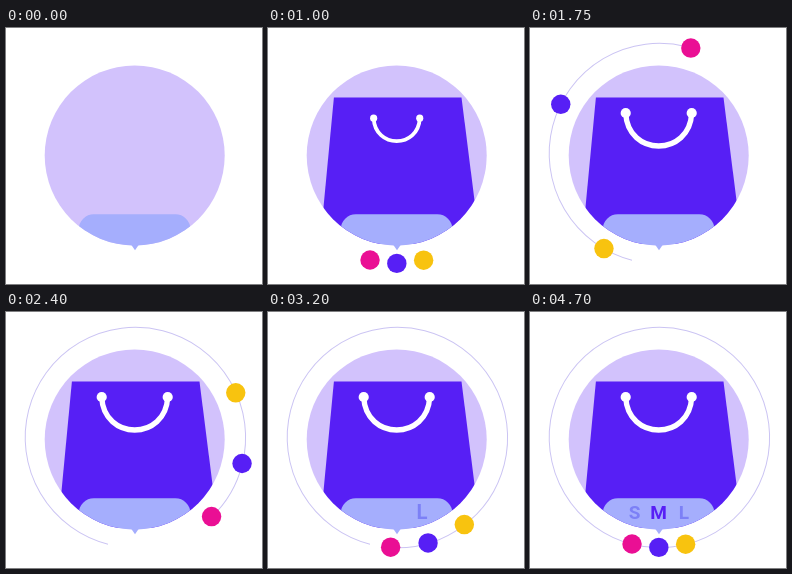
An HTML page that plays this animation: 256 px wide and 256 px high, repeating every 4.75 s.

```html
<!DOCTYPE html>
<html lang="en">
<head>
<meta charset="utf-8">
<title>Shopping bag</title>
<style>
  html, body { margin: 0; height: 100%; overflow: hidden; background: #fff; }
  svg { display: block; width: 100vw; height: 100vh; }
  text { font: 700 19px Roboto, sans-serif; text-anchor: middle; fill: #7c80f6; }
</style>
</head>
<body>
<svg viewBox="0 0 256 256">
  <clipPath id="disc"><circle cx="128.7" cy="127.5" r="90"/></clipPath>
  <circle cx="128.7" cy="127.5" r="90" fill="#d2c2fc"/>
  <g clip-path="url(#disc)">
    <path id="bag" d="M65.9 69.5H193.5L212 216H52Z" fill="#571ff5"/>
    <g id="handle" fill="#fff">
      <path d="M95.7 85C97.7 129 159.7 129 161.7 85" fill="none" stroke="#fff" stroke-width="5.4"/>
      <circle cx="95.7" cy="85" r="5.1"/>
      <circle cx="161.7" cy="85" r="5.1"/>
    </g>
    <rect x="72.8" y="186.3" width="111.6" height="60" rx="15" fill="#a5aefd"/>
  </g>
  <path d="M125 216.5H133L129 222.3Z" fill="#a5aefd"/>
  <g id="letters">
    <text x="104.5" y="207">S</text>
    <text x="128.5" y="207" style="fill:#571ff5">M</text>
    <text x="154" y="207">L</text>
  </g>
  <circle id="trail" cx="129.4" cy="125.5" r="110.2" pathLength="360" transform="rotate(104.4 129.4 125.5)" fill="none" stroke="#cbc4f3"/>
  <g id="dots">
    <circle r="9.7" fill="#ea0f94"/>
    <circle r="9.7" fill="#571ff5"/>
    <circle r="9.7" fill="#f8c30f"/>
  </g>
</svg>
<script>
const LOOP = 4750;
const $ = id => document.getElementById(id);
const clamp = x => Math.min(1, Math.max(0, x));
const smooth = x => (x = clamp(x), x * x * (3 - 2 * x));

// Grow from nothing, overshoot slightly, settle at 1.
const pop = (t, rise = 300, over = 0.07) =>
  smooth(t / rise) * (1 + over) - smooth((t - rise) / 350) * over;

// Cubic bezier (0.28, 0, 0, 1), solved by bisection.
function orbitEase(x) {
  x = clamp(x);
  let lo = 0, hi = 1;
  for (let i = 0; i < 24; i++) {
    const p = (lo + hi) / 2;
    if (0.84 * p * (1 - p) ** 2 + p ** 3 < x) lo = p; else hi = p;
  }
  return smooth((lo + hi) / 2);
}

function scaleAt(el, x, y, s) {
  el.setAttribute('transform', `translate(${x} ${y}) scale(${s}) translate(${-x} ${-y})`);
}

function draw(t) {
  scaleAt($('bag'), 130, 212, pop(t - 150));
  scaleAt($('handle'), 128.7, 102, pop(t - 820));

  [...$('letters').children].forEach((letter, i) =>
    scaleAt(letter, +letter.getAttribute('x'), 200, pop(t - 3400 + i * 200, 200)));

  const travel = i => 360 * orbitEase((t - 1070 - i * 161) / 2930);
  const size = smooth((t - 660) / 240);
  [...$('dots').children].forEach((dot, i) => {
    const a = (104.3 - 14.1 * i + travel(i)) * Math.PI / 180;
    const x = 129.2 + 110 * Math.cos(a), y = 125.4 + 110 * Math.sin(a);
    dot.setAttribute('transform', `translate(${x} ${y}) scale(${size})`);
  });
  $('trail').setAttribute('stroke-dasharray', `${travel(0)} 400`);
}

const start = performance.now();
function tick() {
  draw((performance.now() - start) % LOOP);
  requestAnimationFrame(tick);
}
tick();
</script>
</body>
</html>
```
